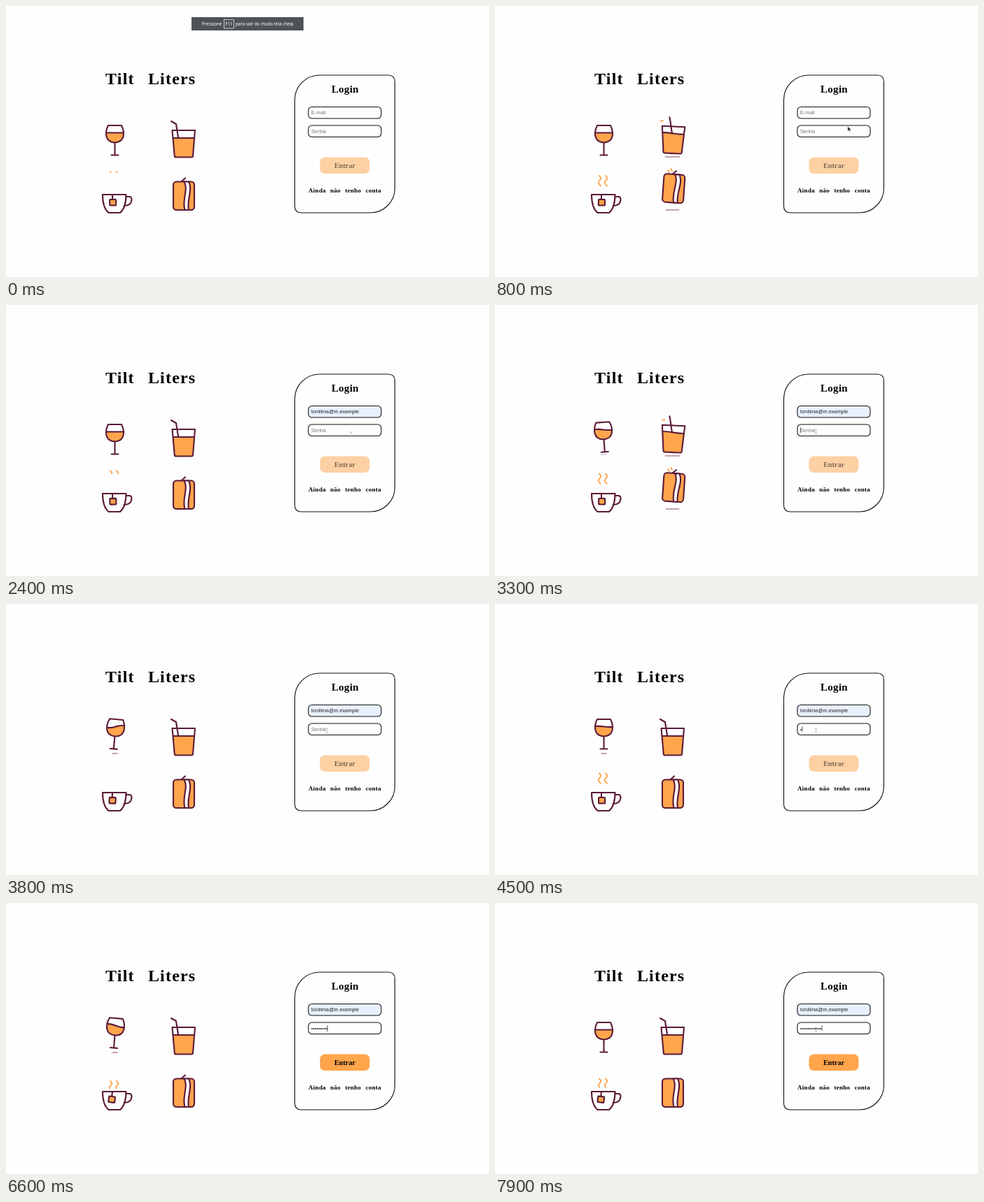
An HTML page that plays this animation: 690 px wide and 388 px high, repeating every 8000 ms.

```html
<!DOCTYPE html>
<html lang="pt">
<head>
<meta charset="utf-8">
<title>Login</title>
<style>
html, body { margin: 0; width: 100%; height: 100%; overflow: hidden; background: #fefefe; }
svg { display: block; width: 690px; height: 388px; }
.serif { font-family: "Liberation Serif", serif; font-weight: 700; }
.field { font: 7.3px "Liberation Sans", sans-serif; fill: #222; }
.ui { font-family: "Noto Sans", sans-serif; }
.hint { fill: #777; }
.ink { fill: none; stroke: #5b1a38; stroke-width: 2.1; stroke-linecap: round; stroke-linejoin: round; }
.juice { fill: #ffa54c; }
.milk { fill: #fefefe; }
.drop { fill: none; stroke: #ffa54c; stroke-width: 1.9; stroke-linecap: round; }
.shade { stroke: #c5a0b8; stroke-width: 2; stroke-linecap: round; }
.box { fill: #fefefe; stroke: #111; stroke-width: 1.1; }
.filled { fill: #e8f0fe; }
</style>
</head>
<body>
<svg viewBox="0 0 690 388">
  <defs>
    <path id="bowl" d="M146 171H165C170 181 170 195 155.5 195.5C141 195 141 181 146 171Z"/>
    <path id="tumbler" d="M237.5 178H270L267 215Q266.8 216.5 265 216.5H243Q241 216.5 240.8 215Z"/>
    <clipPath id="inBowl"><use href="#bowl"/></clipPath>
    <clipPath id="inTumbler"><use href="#tumbler"/></clipPath>
    <filter id="soft" x="-10%" y="-10%" width="120%" height="130%"><feDropShadow dx="0" dy="1" stdDeviation="1" flood-opacity=".22"/></filter>
  </defs>

  <g id="notice" class="ui" font-size="6.2" fill="#fff">
    <rect x="265" y="16" width="160" height="19" fill="#505356"/>
    <rect x="311.5" y="19.5" width="14" height="12.5" fill="none" stroke="#ddd" stroke-width=".8"/>
    <text x="280" y="28">Pressione</text>
    <text x="318.5" y="28" text-anchor="middle">F11</text>
    <text x="328" y="28">para sair do modo tela cheia</text>
  </g>

  <text class="serif" x="142" y="112" font-size="24" letter-spacing="1.2" word-spacing="12">Tilt Liters</text>

  <path id="wineShade" class="shade" d="M152 214h7"/>
  <g id="wine">
    <g clip-path="url(#inBowl)"><path id="wineTop" class="ink juice"/></g>
    <use href="#bowl" class="ink"/>
    <path class="ink" d="M155.5 196V213.500M150.500 213.500h10"/>
  </g>

  <path id="glassShade" class="shade" d="M243.500 216h20"/>
  <g id="glass">
    <g clip-path="url(#inTumbler)"><path id="glassTop" class="ink juice"/></g>
    <path id="straw" class="ink"/>
    <use href="#tumbler" class="ink"/>
  </g>
  <path id="splash" class="drop" d="M0 0h3.500"/>

  <path id="steam" class="drop"/>
  <path class="ink" d="M138 270H171.500C171.500 282 169 291 163 296H146.500C140.500 291 138 282 138 270ZM171.500 273H176Q179.500 273 179.500 277Q179 286 168.500 286"/>
  <g id="bag">
    <path class="ink" d="M152 270v7"/>
    <rect class="ink juice" x="148" y="277" width="9" height="8.500" rx=".8"/>
  </g>

  <path id="canShade" class="shade" d="M244.500 292h18"/>
  <path id="sparks" class="drop" d="M247 235l2 3M251.500 233l1.500 3"/>
  <g id="can">
    <path id="tab" class="ink" d="M250.500 251.500l5.500 -5"/>
    <rect class="ink juice" x="239" y="251.500" width="30" height="40.500" rx="4.500"/>
    <path class="ink milk" d="M254.500 251.500C261 263 251 277 255.500 292H261C258 277 267 264 261 251.500Z"/>
  </g>

  <path class="box" d="M448 99H546Q555.500 99 555.500 108.500V261A35 35 0 0 1 520.500 296H422Q412.500 296 412.500 286.500V134.500A35.500 35.500 0 0 1 448 99Z"/>
  <text class="serif" x="465" y="124" font-size="15" letter-spacing=".3">Login</text>
  <rect id="mailBox" class="box" x="432" y="144.500" width="104" height="16.500" rx="5"/>
  <rect class="box" x="432" y="171" width="104" height="16.500" rx="5"/>
  <text id="mail" class="field" x="436" y="155"></text>
  <text id="pass" class="field" x="436" y="181.500"></text>
  <path id="caret" stroke="#222" stroke-width=".7" d="M.4 0v8"/>

  <g id="button">
    <rect class="juice" x="448.500" y="216.500" width="71" height="23.500" rx="7"/>
    <text class="serif" x="469" y="232" font-size="10.200">Entrar</text>
  </g>
  <text class="serif" x="432" y="267" font-size="9" letter-spacing=".3" word-spacing="3.700">Ainda não tenho conta</text>

  <g id="list" class="ui" font-size="5.500" fill="#222">
    <rect x="467" y="163" width="78" height="43" fill="#fff" filter="url(#soft)"/>
    <rect id="pick" x="467" y="179" width="78" height="12.500" fill="#eee"/>
    <text x="471.500" y="174.500">ger@bebemos.example</text>
    <text x="471.500" y="187.200">tonilima@m.example</text>
    <text x="471.500" y="200">juliva@bebemos.example</text>
  </g>
  <g id="mouse">
    <path id="beam" fill="none" stroke="#888" stroke-width=".5" d="M-1.500 -3h3M0 -3v6M-1.500 3h3"/>
    <path id="arrow" fill="#222" stroke="#fff" stroke-width=".4" d="M0 0V7L1.700 5.400L3 8L4 7.500L2.800 5H5Z"/>
  </g>
</svg>
<script>
const LOOP = 8, CYCLE = 2.45, PUFF = CYCLE / 2;
const { sin, cos, floor, PI } = Math;
const $ = id => document.getElementById(id);
const set = (id, name, value) => $(id).setAttribute(name, value);
const show = (id, amount) => set(id, 'opacity', +amount);
const move = (id, x, y, turn = 0, cx = 0, cy = 0) =>
  set(id, 'transform', `translate(${x} ${y}) rotate(${turn} ${cx} ${cy})`);

const frac = x => x - floor(x);
const within = (t, a, b) => t > a && t < b;
const lerp = (a, b, u) => a + (b - a) * u;
function ease(t, a, b) {
  const u = Math.min(1, Math.max(0, (t - a) / (b - a)));
  return u * u * (3 - 2 * u);
}
// Rises from 0 to 1 after a, falls back after b.
const hold = (t, a, b, ramp) => ease(t, a, a + ramp) - ease(t, b, b + ramp);

const liquid = (x, y, w, amp) =>
  `M${x} ${y}q${w / 4} ${amp} ${w / 2} 0t${w / 2} 0v40h${-w}Z`;

function wine(p) {
  const hop = hold(p, .8, 2.1, .1);
  const sway = 6 * sin(2 * PI * (p - 1.65) / .36) * hold(p, .8, 1.8, .08);
  move('wine', 0, -6 * hop, sway, 155.5, 195);
  set('wineTop', 'd', liquid(136, 181.5, 39, 5 * sin(6 * p) * hop));
  show('wineShade', hop);
}

function glassAndCan(p) {
  const hop = hold(p, .6, 1.15, .18);
  move('glass', .5 * hop, -5.5 * hop, 2.5 * hop, 254, 197);
  set('glassTop', 'd', liquid(230, 189 - hop, 48, 2 * sin(5 * p) * hop));
  set('straw', 'd', `M${lerp(236, 247.5, hop)} 165L${lerp(243, 248.5, hop)} 169L${lerp(246, 252, hop)} 188`);
  show('glassShade', hop);

  if (p < 1.2) move('splash', 236.5 + 50 * (p - .8), 164.5);
  else move('splash', 252.5, 160 + 700 * (p - 1.5) ** 2);
  show('splash', within(p, .72, .95) || within(p, 1.4, 1.62));

  move('can', 1.2 * hop, -10.5 * hop, 4 * hop, 254, 272);
  show('canShade', hop);
  show('tab', !within(p, .5, .7));
  show('sparks', within(p, .72, 1));
}

function tea(t) {
  const puff = frac(t / PUFF + .8), rise = puff / .82;
  const top = 267 - 30 * (1 - (1 - rise) ** 2), base = 267 - 30 * rise ** 2;
  let d = '';
  for (const x of [149.5, 158.5])
    for (let y = top, step = 'M'; y <= base; y += .5, step = 'L')
      d += `${step}${x - 1.7 * sin((y - top) * .52 + 2.8)} ${y}`;
  set('steam', 'd', d);
  show('steam', rise < 1);
  move('bag', 0, 0, 2 + 5 * cos(2 * PI * (puff - .15)), 152, 270);
}

function form(t) {
  show('notice', 1 - ease(t, .3, .7));
  const filled = t > 2.3, inPass = t > 2.95;
  const typed = t < 4.4 ? 0 : 1 + floor(11 * ease(t, 4.4, 7.7));
  $('mail').textContent = filled ? 'tonilima@m.example' : 'E-mail';
  $('mail').classList.toggle('hint', !filled);
  $('mailBox').classList.toggle('filled', filled);
  $('pass').textContent = '•'.repeat(typed) || 'Senha';
  $('pass').classList.toggle('hint', !typed);

  move('caret', 436 + (typed && $('pass').getComputedTextLength()), inPass ? 175 : 148.5);
  const focused = inPass || within(t, 1.2, 2.3);
  show('caret', typed || (focused && frac(t - 1.2) < .5));
  show('list', within(t, 1.25, 2.3));
  show('pick', t > 2.05);
  set('button', 'fill-opacity', lerp(.5, 1, ease(t, 6.1, 6.45)));

  const enter = ease(t, .6, 1), choose = ease(t, 1.85, 2.1), leave = ease(t, 2.4, 2.85);
  move('mouse', 523 - 38 * enter + 8 * choose - 34.5 * leave, 192 - 39 * enter + 32 * choose - 4 * leave);
  const pointing = t < .9 || within(t, 1.95, 2.4);
  show('mouse', t > .6);
  show('arrow', pointing);
  show('beam', !pointing);
}

function frame() {
  const t = performance.now() / 1000 % LOOP;
  wine(t % CYCLE);
  glassAndCan(t % CYCLE);
  tea(t);
  form(t);
  requestAnimationFrame(frame);
}
frame();
</script>
</body>
</html>
```
